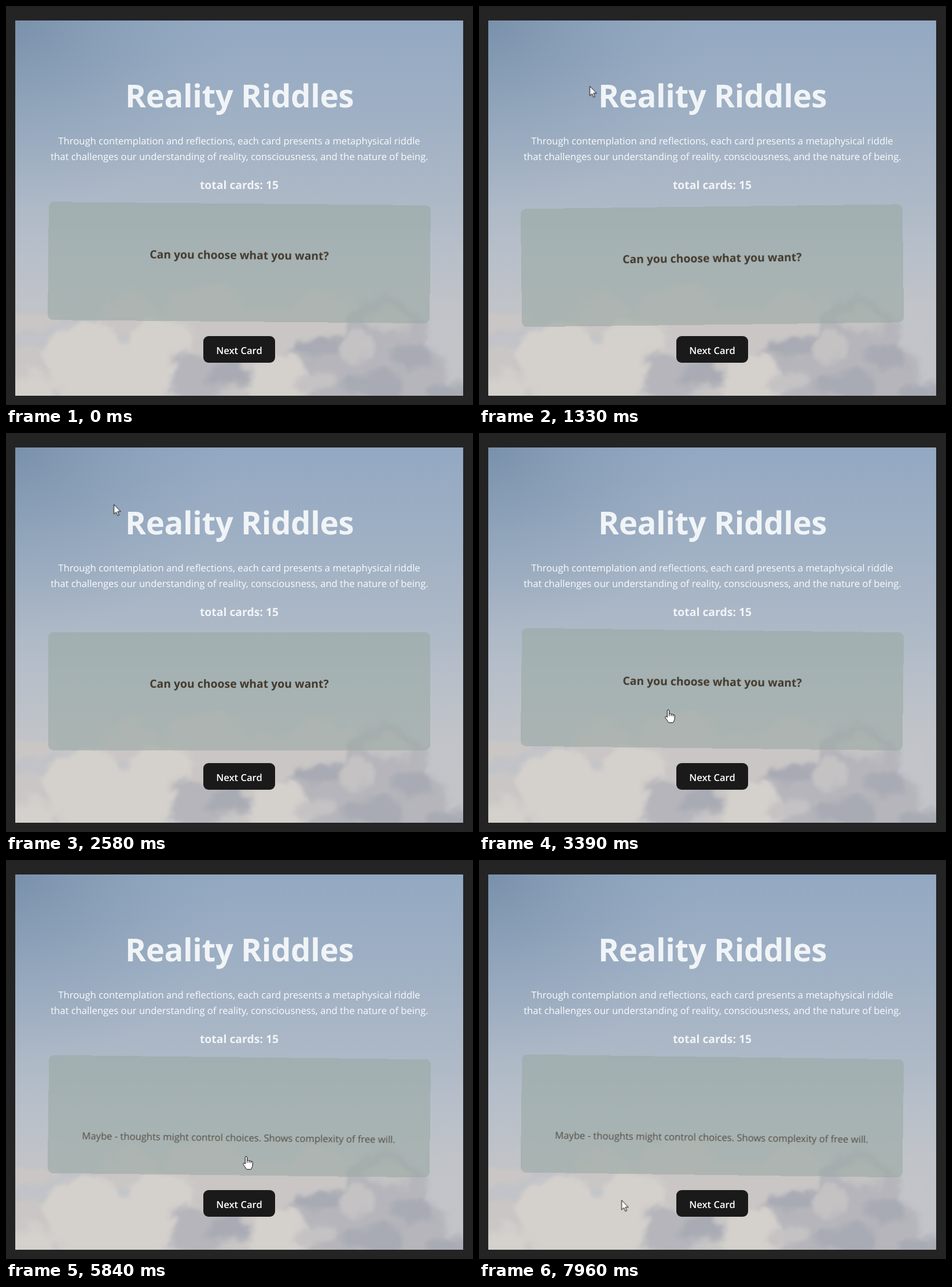
An HTML page that plays this animation: 807 px wide and 689 px high, repeating every 8000 ms.

```html
<!DOCTYPE html>
<html lang="en">
<head>
<meta charset="utf-8">
<title>Reality Riddles</title>
<style>
  html, body { margin: 0; width: 100%; height: 100%; overflow: hidden; background: #242424; }
  svg { position: absolute; left: 0; top: 0; width: 100vw; height: 100vh; display: block; }
  text {
    font-family: "Open Sans", "Noto Sans", sans-serif; font-size: 16.62px;
    text-anchor: middle; text-rendering: geometricPrecision; fill: #fafbfc;
  }
  .title { font-size: 54.6px; font-weight: 700; letter-spacing: -.008em; fill: #f1f4f7; }
  .bold { font-size: 19.4px; font-weight: 700; fill: #f1f4f7; }
  .label { font-weight: 600; fill: #fff; }
  .question { fill: #43382b; }
  .answer { fill: #544d42; }

  .card, .pointer, .arrow, .hand, .click, .question, .answer { animation: 8s linear infinite; }
  .arrow, .hand, .click, .question, .answer { animation-timing-function: step-end; }

  /* The card sways, and rests while the pointer is over it. */
  .card { transform-box: view-box; transform-origin: 403px 446px; animation-name: sway; }
  @keyframes sway {
    0% { transform: translateY(-2.9px) rotate(.52deg); animation-timing-function: cubic-bezier(.25, .4, .6, 1); }
    6.875% { transform: translateY(0) rotate(0deg); animation-timing-function: ease-in-out; }
    18.75% { transform: translateY(2.5px) rotate(-.76deg); animation-timing-function: ease-in-out; }
    30.9% { transform: translateY(0) rotate(0deg); animation-timing-function: cubic-bezier(.5, 0, .8, .75); }
    38.5%, 93.7% { transform: translateY(-3.5px) rotate(.67deg); animation-timing-function: ease-out; }
    98%, 100% { transform: translateY(-4.1px) rotate(.77deg); }
  }

  .pointer { animation-name: travel; }
  @keyframes travel {
    0%, 1.75% { transform: translate(330px, 655px); }
    10.75% { transform: translate(206px, 173px); }
    16.625%, 18.2% { transform: translate(191.5px, 138.5px); }
    20.75%, 33% { transform: translate(186.5px, 123.5px); }
    41.5% { transform: translate(298px, 467px); }
    42.375%, 43.2% { transform: translate(327px, 478px); animation-timing-function: ease-out; }
    49.875%, 66.5% { transform: translate(412px, 481.5px); }
    73%, 90.6% { transform: translate(415px, 512px); }
    96.25%, 98.75% { transform: translate(244px, 586px); }
    99.5%, 100% { transform: translate(246.5px, 587.5px); }
  }

  .arrow { animation-name: arrow; }
  @keyframes arrow {
    0%, 3.75%, 38.5% { opacity: 0; }
    1.75%, 7.56%, 93.7%, 100% { opacity: 1; }
  }
  .hand { animation-name: hand; }
  @keyframes hand {
    0%, 7.56%, 93.7%, 100% { opacity: 0; }
    3.75%, 38.5% { opacity: 1; }
  }
  .click { animation-name: click; }
  @keyframes click {
    0%, 60.625%, 100% { opacity: 0; }
    59.75% { opacity: 1; }
  }
  .question { animation-name: ask; }
  @keyframes ask {
    0% { opacity: 1; }
    60.625%, 100% { opacity: 0; }
  }
  .answer { animation-name: reply; }
  @keyframes reply {
    0% { opacity: 0; }
    60.625%, 100% { opacity: 1; }
  }
</style>
</head>
<body>
<svg viewBox="0 0 807 689">
  <defs>
    <linearGradient id="sky" x2="0" y2="1">
      <stop offset="0" stop-color="#93a8c2"/>
      <stop offset="0.25" stop-color="#9fb0c4"/>
      <stop offset="0.45" stop-color="#abb7c6"/>
      <stop offset="0.62" stop-color="#b7bfc9"/>
      <stop offset="0.75" stop-color="#c0c3c8"/>
      <stop offset="1" stop-color="#c3c4c8"/>
    </linearGradient>
    <radialGradient id="corner" cx="0" cy="0" r="0.5">
      <stop offset="0" stop-color="#738ba5" stop-opacity="0.8"/>
      <stop offset="1" stop-color="#8ba1b8" stop-opacity="0"/>
    </radialGradient>
    <filter id="puff" filterUnits="userSpaceOnUse" x="-30" y="380" width="880" height="350" color-interpolation-filters="sRGB">
      <feGaussianBlur stdDeviation="5" result="soft"/>
      <feTurbulence type="fractalNoise" baseFrequency="0.022" numOctaves="3" seed="7"/>
      <feDisplacementMap in="soft" scale="38" xChannelSelector="R" yChannelSelector="G"/>
    </filter>
    <clipPath id="frame"><path d="M16 25H790V673H16z"/></clipPath>
  </defs>

  <g clip-path="url(#frame)">
    <path d="M16 25H790V673H16z" fill="url(#sky)"/>
    <path d="M16 25H790V673H16z" fill="url(#corner)"/>
    <g filter="url(#puff)">
      <g fill="#c9c6c5">
        <ellipse cx="20" cy="545" rx="75" ry="17"/>
        <ellipse cx="40" cy="645" rx="90" ry="60"/>
        <ellipse cx="215" cy="535" rx="52" ry="40"/>
        <ellipse cx="345" cy="540" rx="78" ry="57"/>
        <ellipse cx="550" cy="545" rx="60" ry="55"/>
        <ellipse cx="440" cy="600" rx="170" ry="80"/>
      </g>
      <g fill="#b5b5bb">
        <ellipse cx="655" cy="565" rx="72" ry="60"/>
        <ellipse cx="690" cy="650" rx="75" ry="70"/>
        <ellipse cx="570" cy="630" rx="95" ry="62"/>
        <ellipse cx="330" cy="640" rx="75" ry="40"/>
      </g>
      <g fill="#d4d0cc">
        <ellipse cx="135" cy="610" rx="66" ry="66"/>
        <ellipse cx="190" cy="645" rx="100" ry="60"/>
        <ellipse cx="270" cy="575" rx="58" ry="32"/>
        <ellipse cx="470" cy="645" rx="60" ry="40"/>
        <ellipse cx="40" cy="660" rx="45" ry="28"/>
      </g>
      <g fill="#a9abb4">
        <ellipse cx="635" cy="655" rx="60" ry="24"/>
        <ellipse cx="540" cy="585" rx="45" ry="18"/>
        <ellipse cx="700" cy="605" rx="35" ry="24"/>
        <ellipse cx="385" cy="640" rx="35" ry="20"/>
        <ellipse cx="770" cy="672" rx="45" ry="20"/>
      </g>
      <g fill="#c4c2c3">
        <ellipse cx="605" cy="590" rx="34" ry="22"/>
        <ellipse cx="660" cy="540" rx="35" ry="22"/>
        <ellipse cx="535" cy="650" rx="35" ry="18"/>
      </g>
    </g>
  </g>
</svg>

<svg viewBox="0 0 807 689">
  <text class="title" x="403.5" y="175">Reality Riddles</text>
  <text x="403" y="239">Through contemplation and reflections, each card presents a metaphysical riddle</text>
  <text x="403.5" y="266">that challenges our understanding of reality, consciousness, and the nature of being.</text>
  <text class="bold" x="403" y="316">total cards: 15</text>

  <g class="card">
    <rect x="73" y="344" width="660" height="204" rx="9" fill="#9aa8a4" fill-opacity="0.6"/>
    <text class="bold question" x="403" y="440">Can you choose what you want?</text>
    <text class="answer" x="402.5" y="489">Maybe - thoughts might control choices. Shows complexity of free will.</text>
  </g>

  <rect x="341" y="570" width="124" height="46" rx="9" fill="#1a1a1a"/>
  <text class="label" x="403" y="601">Next Card</text>

  <circle class="click" cx="412" cy="480.5" r="12" fill="#d0d158"/>
  <g class="pointer" fill="#fff" stroke="#000" stroke-linejoin="round">
    <path class="arrow" d="M0 0V16.5L3.8 13L6.4 19L9 17.9L6.4 12.1H11.6z"/>
    <g class="hand">
      <path d="M-1.7 13V1.7a1.7 1.7 0 0 1 3.4 0V7.5c.3-1.4 3.2-1.2 3.4.4.5-1 3-.7 3.2.8.6-.9 2.9-.4 2.9 1.4V14c0 3-1 4-1.7 6.3q-.2 1.9-2 1.9H1.8q-1.5 0-2.2-1.5c-1.2-3-3.6-5-4.9-7.3-.7-1.5 1.6-3 3.6-.4z"/>
      <path d="M1.7 7.5V11M5.1 8V11M8.3 8.8V11.5" fill="none"/>
    </g>
  </g>
</svg>
</body>
</html>
```
